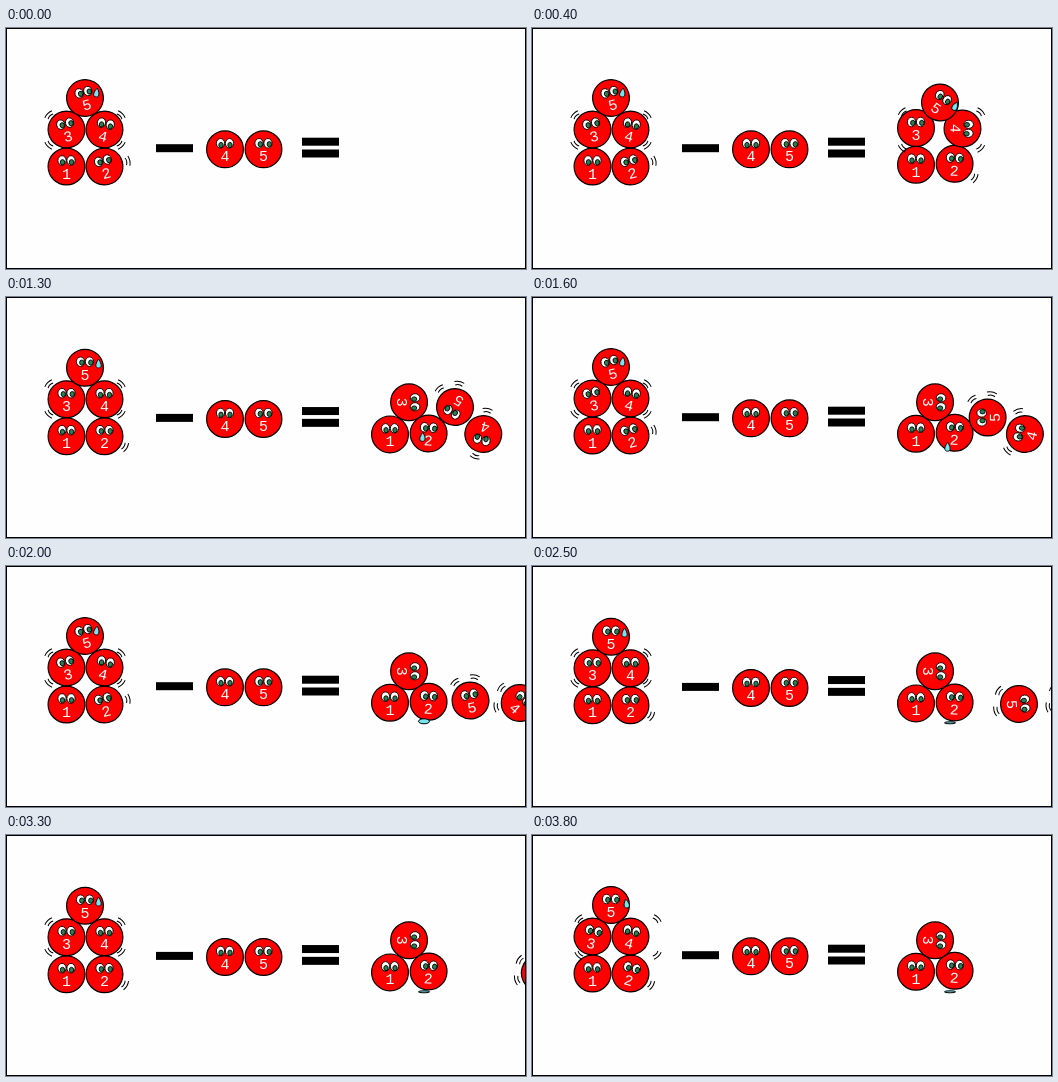
Write an HTML page with a canvas that moves like this. It is 520x241 px and loops after 3900 ms.

```html
<!DOCTYPE html>
<html lang="en">
<head>
<meta charset="utf-8">
<title>Five minus two</title>
<style>
html, body { margin: 0; width: 100%; height: 100%; overflow: hidden; background: #fff; }
canvas { display: block; }
</style>
</head>
<body>
<canvas id="stage" width="520" height="241"></canvas>
<script>
const ctx = document.getElementById('stage').getContext('2d');
const STEP = 100, STEPS = 39, RADIUS = 18.4, GROUND = 137;
const RED = '#ff0000', GREEN = '#2a8050', CYAN = '#76e5ee';

const rad = deg => deg * Math.PI / 180;
const mix = (a, b, u) => a + (b - a) * u;
const progress = (step, from, to) => Math.min(1, Math.max(0, (step - from) / (to - from)));

function placed(x, y, deg, paint) {
  ctx.save();
  ctx.translate(x, y);
  ctx.rotate(rad(deg));
  paint();
  ctx.restore();
}

function oval(x, y, rx, ry, fill, width) {
  ctx.beginPath();
  ctx.ellipse(x, y, rx, ry, 0, 0, Math.PI * 2);
  ctx.fillStyle = fill;
  ctx.fill();
  ctx.lineWidth = width;
  ctx.stroke();
}

function ball(n, { x, y, turn = 0 }) {
  const [lookX, lookY] = n % 3 === 1 ? [.5, 1.7] : [1.3, .9];
  placed(x, y, turn, () => {
    oval(0, 0, RADIUS, RADIUS, RED, 1.2);
    for (const eyeX of [-4.5, 4.5]) {
      oval(eyeX, -6, 4.1, 4.8, '#fff', .9);
      oval(eyeX + lookX, -6 + lookY, 2.2, 2.6, GREEN, .9);
    }
    ctx.fillStyle = '#fff';
    ctx.fillText(n, 0, 12);
  });
}

function drop(x, y, deg) {
  placed(x, y, deg, () => {
    ctx.beginPath();
    ctx.moveTo(0, -5);
    ctx.bezierCurveTo(4, 1, 3, 4, 0, 4);
    ctx.bezierCurveTo(-3, 4, -4, 1, 0, -5);
    ctx.fillStyle = CYAN;
    ctx.fill();
    ctx.lineWidth = .9;
    ctx.stroke();
  });
}

// A pair of motion lines curving outwards.
function mark(x, y, deg) {
  placed(x, y, deg, () => {
    ctx.lineWidth = 1;
    for (const [dx, half] of [[-1.5, 3.6], [1.7, 5]]) {
      ctx.beginPath();
      ctx.moveTo(dx - .8, -half);
      ctx.quadraticCurveTo(dx + 1.2, 0, dx - .8, half);
      ctx.stroke();
    }
  });
}

function markAround({ x, y }, deg) {
  mark(x + 24 * Math.cos(rad(deg)), y + 24 * Math.sin(rad(deg)), deg);
}

function pileMarks(x, y, reach, lowAngle) {
  for (const side of [-1, 1]) {
    for (const end of [-1, 1]) {
      const dx = 36 * side + reach * (7 + 3 * side);
      mark(x + dx, y + end * (15 + 3 * reach), Math.atan2(end, side) * 180 / Math.PI);
    }
  }
  markAround({ x: x + 19.5, y: y + 36 }, lowAngle);
}

function bar(x, y) {
  ctx.fillStyle = '#000';
  ctx.fillRect(x, y, 37, 8);
}

// Swing goes -1, 0, 1, 0.
function wobblingPile(swing, lift) {
  const tilt = [0, 15 * swing, 13 * swing, 13 * Math.abs(swing), 15 * Math.min(0, swing)];
  tilt.forEach((turn, i) => {
    const x = i === 4 ? 79 : 60.5 + 38 * (i % 2);
    const y = i === 4 ? 70 : 138.5 - 37 * Math.floor(i / 2);
    ball(i + 1, { x, y: y + lift, turn });
  });
  drop(92.5 + 2 * swing, 67 + 2 * swing, -10 * swing);
  pileMarks(79, 102, Math.max(0, swing), swing < 0 ? -12 : 30);
}

// Ball 3 rolls over ball 1 into the gap.
function thirdBall(step) {
  const u = progress(step, 5, 11), angle = rad(31 * u);
  return { x: 384 + 37 * Math.sin(angle), y: GROUND - 37 * Math.cos(angle), turn: 90 * u };
}

// Ball 4 tips over, drops and spins away.
function fourthBall(step) {
  return {
    x: Math.max(421, 430.5 + 5.2 * (step - 4)),
    y: mix(100, GROUND, progress(step, 2, 10) ** 3),
    turn: mix(15, 92, progress(step, 1, 4)) + 11.5 * Math.max(0, step - 4) + 18 * Math.max(0, step - 13)
  };
}

// Ball 5 slides over ball 2 and rolls off; stops are step, x, y.
const stops = [[1, 402, 69], [4, 408, 74.5], [13, 449, 110], [20, 464.5, 134.5], [25, 487, 138], [38, 563, 138]];
function fifthBall(step) {
  const next = Math.max(1, stops.findIndex(s => s[0] >= step));
  const [from, x0, y0] = stops[next - 1], [to, x1, y1] = stops[next];
  const u = progress(step, from, to);
  return { x: mix(x0, x1, u), y: mix(y0, y1, u), turn: 35 + 19.6 * (step - 4) };
}

function fallingTear(step) {
  if (step >= 20) {
    const height = Math.max(1, 2.5 - .3 * (step - 20));
    oval(418, 157.8 - height, 5.5, height, CYAN, 1);
    return;
  }
  const u = 1 - (1 - progress(step, 4, 20)) ** 2;
  const start = fifthBall(Math.min(step, 4));
  drop(mix(start.x + 15, 415, u), mix(start.y + 4, 155, u), mix(25, 0, u));
}

function result(step, lift) {
  const fourth = fourthBall(step), fifth = fifthBall(step);
  ball(1, { x: 384, y: 136.7 + lift });
  ball(2, { x: 422.6, y: 135.8 + lift, turn: 3 });
  ball(3, thirdBall(step));
  ball(4, fourth);
  ball(5, fifth);
  fallingTear(step);

  if (step < 7) {
    pileMarks(402.5, 102, 1, 30);
    return;
  }
  const trail = (centre, back, spread) => {
    for (const side of [-1, 1]) markAround(centre, back + side * spread);
  };
  trail(fourth, 195, mix(85, 25, progress(step, 13, 20)));
  trail(fifth, fifth.y < GROUND ? 255 : 188, 25);
}

function draw(step) {
  const swing = Math.round(-Math.cos(step * Math.PI / 2));
  const lift = swing === 0 ? .7 : 0;
  ctx.fillStyle = '#fefefe';
  ctx.fillRect(0, 0, 520, 241);
  ctx.strokeStyle = '#000';
  ctx.font = '15px "Liberation Mono", monospace';
  ctx.textAlign = 'center';

  wobblingPile(swing, lift);
  bar(150, 116.2 + lift);
  ball(4, { x: 219, y: 121.3 + lift });
  ball(5, { x: 257.5, y: 121.3 + lift });
  bar(296, 109.7 + lift / 2);
  bar(296, 121.5 + lift / 2);
  if (step > 0) result(step, lift);

  ctx.lineWidth = 1;
  ctx.strokeRect(.5, .5, 519, 240);
}

const origin = performance.now();
function tick() {
  draw(Math.floor((performance.now() - origin) / STEP) % STEPS);
  requestAnimationFrame(tick);
}
tick();
</script>
</body>
</html>
```
